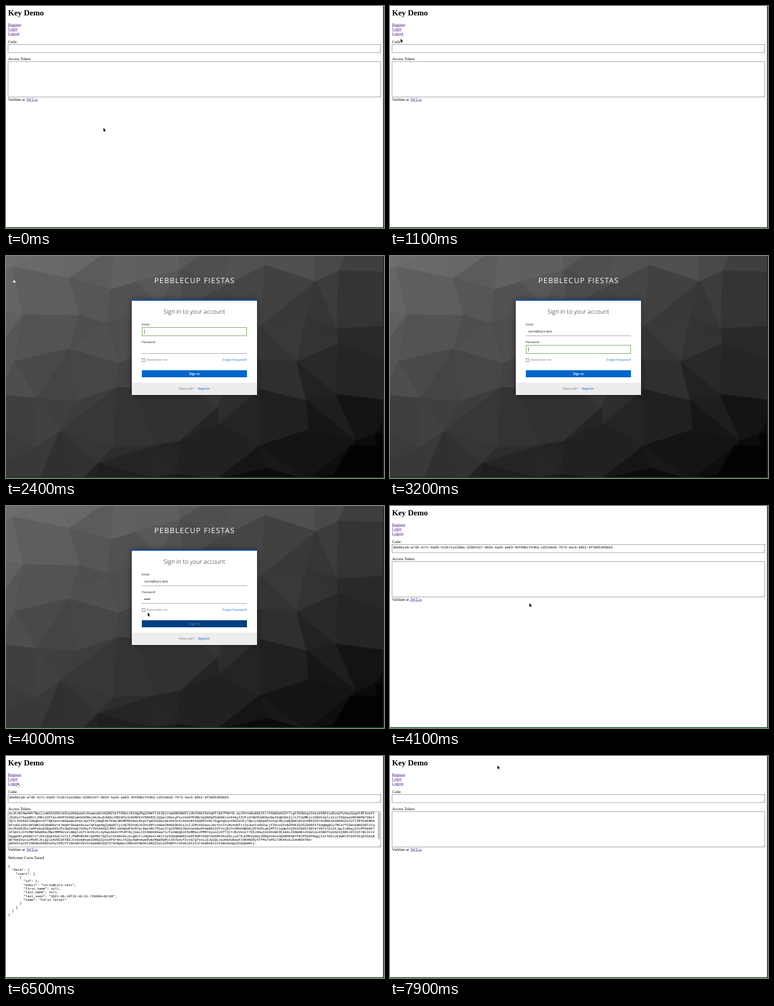
An HTML page with a canvas for the animation above (8000 ms loop, 640 by 377 pixels).

```html
<!DOCTYPE html>
<html lang="en">
<head>
<meta charset="utf-8">
<title>Sign-in demo</title>
<style>
html, body { margin: 0; width: 100%; height: 100%; overflow: hidden; background: #fff; }
canvas { display: block; width: 640px; height: 377px; }
</style>
</head>
<body>
<canvas id="stage"></canvas>
<script>
const W = 640, H = 377, LOOP = 8000, STEP = 100;
const SERIF = '"Liberation Serif", "Times New Roman", serif';
const MONO = '"Liberation Mono", "Courier New", monospace';
const SANS = '"Open Sans", sans-serif';
const VISITED = '#551a8b', BLUE = '#0066cc', GREY = '#72767b', INK = '#151515';
const EMAIL = 'corin@tarn.test', NAME = 'Corin Tarnel';
const CODE = '36e0bca8-a748-417c-b6d5-512b7ca13b8a.52882437-0654-4a34-ae83-46f08bcf440d.cd210dd3-7973-4ecb-8861-6f3065499b65';
const USER = {
  id: 1, email: EMAIL, first_name: null, last_name: null,
  last_seen: '2021-06-19T15:40:31.728586+00:00', name: NAME
};
const JSON_LINES = JSON.stringify({ data: { users: [USER] } }, null, 2).split('\n');

const canvas = document.getElementById('stage');
const dpr = window.devicePixelRatio || 1;
canvas.width = W * dpr;
canvas.height = H * dpr;
const ctx = canvas.getContext('2d');

function seeded(seed) {
  return () => {
    seed = (seed * 1664525 + 1013904223) >>> 0;
    return seed / 4294967296;
  };
}

function makeToken() {
  const rnd = seeded(77);
  const set = 'ABCDEFGHIJKLMNOPQRSTUVWXYZabcdefghijklmnopqrstuvwxyz0123456789IJYWMNZXb';
  const chars = n => Array.from({ length: n }, () => set[Math.floor(rnd() * set.length)]).join('');
  const lines = Array.from({ length: 7 }, () => chars(183));
  lines[0] = 'eyJ' + lines[0].slice(3, 113) + '.eyJ' + lines[0].slice(117);
  lines.push(chars(151) + '-', chars(123) + '-');
  return lines;
}
const TOKEN = makeToken();

function box(x, y, w, h, fill) {
  ctx.fillStyle = fill;
  ctx.fillRect(x, y, w, h);
}

function text(str, x, y, font, color = '#000', align = 'left') {
  ctx.font = font;
  ctx.fillStyle = color;
  ctx.textAlign = align;
  ctx.fillText(str, x, y);
  return ctx.measureText(str).width;
}

function path(points, fill, stroke, width = 1) {
  ctx.beginPath();
  points.forEach(([x, y]) => ctx.lineTo(x, y));
  ctx.closePath();
  if (stroke) {
    ctx.strokeStyle = stroke;
    ctx.lineWidth = width;
    ctx.stroke();
  }
  ctx.fillStyle = fill;
  ctx.fill();
}

function link(str, x, y) {
  const w = text(str, x, y, '6.78px ' + SERIF, VISITED);
  box(x, y + 0.7, w, 0.55, VISITED);
}

function textarea(y, h) {
  ctx.strokeStyle = '#858585';
  ctx.lineWidth = 0.7;
  ctx.strokeRect(3.4, y, 631.3, h);
  ctx.strokeStyle = '#999';
  ctx.lineWidth = 0.4;
  ctx.beginPath();
  for (const d of [1.8, 3.6]) {
    ctx.moveTo(634 - d, y + h - 0.6);
    ctx.lineTo(634, y + h - 0.6 - d);
  }
  ctx.stroke();
}

function drawHome(t) {
  const body = '6.78px ' + SERIF, area = '5.65px ' + MONO;
  const on = (from, to = 6700) => t >= from && t < to;
  box(0, 0, W, H, '#fff');
  text('Key Demo', 3.4, 16, 'bold 13.57px ' + SERIF);
  ['Register', 'Login', 'Logout'].forEach((s, i) => link(s, 3.4, 33.8 + i * 7.63));
  text('Code:', 3.4, 63.4, body);
  textarea(65.6, 13.5);
  text('Access Token:', 3.4, 92.2, body);
  textarea(94.3, 60.2);
  text('Validate at ', 3.4, 160.6, body);
  link('JWT.io', 34.2, 160.6);

  if (on(4100)) text(CODE, 4.7, 71.6, area);
  if (on(4200)) {
    TOKEN.forEach((s, i) => text(s, 4.7, 99.4 + i * 6.37, area));
    box(628.8, 94.8, 5.4, 55, '#fafafa');
    ctx.fillStyle = '#c1c1c1';
    ctx.beginPath();
    ctx.roundRect(629.8, 95.6, 3.4, 46, 1.7);
    ctx.fill();
  }
  if (on(4500)) text('Welcome ' + NAME, 3.4, 174.6, body);
  if (on(4800)) JSON_LINES.forEach((s, i) => text(s, 3.4, 188.8 + i * 6.36, '5.51px ' + MONO));
}

// Faceted backdrop: jittered cells, some split in two, darker towards bottom right.
function drawBackdrop() {
  const rnd = seeded(2024), cols = 11, rows = 7;
  const at = (i, j) => [(i + rnd() * 0.7 - 0.85) * 68, (j + rnd() * 0.7 - 0.85) * 68];
  const grid = Array.from({ length: rows + 1 }, (_, j) =>
    Array.from({ length: cols + 1 }, (_, i) => at(i, j)));
  const facet = pts => {
    const mid = k => pts.reduce((s, p) => s + p[k], 0) / pts.length;
    const v = 112 - 0.077 * mid(0) - 0.16 * mid(1) + (rnd() - 0.5) * 9;
    const g = Math.max(2, Math.round(v));
    const c = `rgb(${g},${g},${g})`;
    path(pts, c, c, 0.6);
  };
  box(0, 0, W, H, '#333');
  for (let j = 0; j < rows; j++) {
    for (let i = 0; i < cols; i++) {
      const a = grid[j][i], b = grid[j][i + 1], c = grid[j + 1][i + 1], d = grid[j + 1][i];
      const split = rnd();
      if (split < 0.3) { facet([a, b, c]); facet([a, c, d]); }
      else if (split < 0.6) { facet([a, b, d]); facet([b, c, d]); }
      else facet([a, b, c, d]);
    }
  }
  path([[583, 322], [640, 322], [640, 377], [551, 377]], '#020202');
}

function field(y, focused) {
  if (focused) {
    ctx.strokeStyle = '#84b070';
    ctx.lineWidth = 1;
    ctx.strokeRect(230.5, y, 177, 14);
  } else {
    box(230, y + 13.5, 178, 1, '#adafb1');
  }
}

function drawLogin(t) {
  const small = '5.05px ' + SANS, input = '5.6px ' + SANS;
  const typed = Math.max(0, Math.min(EMAIL.length, Math.round((t - 2400) / STEP * 2)));
  const dots = Math.max(0, Math.min(4, (t - 3200) / STEP));
  const sent = t >= 3700;
  const focus = sent ? '' : t < 3200 ? 'email' : 'password';

  drawBackdrop();
  ctx.letterSpacing = '1.26px';
  text('PEBBLECUP FIESTAS', 319.5, 46.3, '12.4px ' + SANS, '#fff', 'center');
  ctx.letterSpacing = '0px';

  ctx.shadowColor = 'rgba(0,0,0,.4)';
  ctx.shadowBlur = 10 * dpr;
  box(213, 74, 212, 162, '#fff');
  ctx.shadowColor = 'transparent';
  box(213, 74, 212, 2, '#0b58a8');
  box(213, 215, 212, 21, '#ededed');
  text('Sign in to your account', 319, 98, '300 10.2px ' + SANS, INK, 'center');

  text('Email', 230, 118.3, small, INK);
  field(121.5, focus === 'email');
  const w = text(EMAIL.slice(0, typed), 233.9, 130, input, INK);
  if (focus === 'email') box(233.9 + w, 124.8, 0.6, 7.2, '#222');

  text('Password', 230, 148.3, small, INK);
  field(151.5, focus === 'password');
  ctx.fillStyle = INK;
  for (let i = 0; i < dots; i++) {
    ctx.beginPath();
    ctx.arc(235.2 + i * 2.6, 158.3, 0.95, 0, 7);
    ctx.fill();
  }
  if (focus === 'password') box(234 + dots * 2.6, 154.8, 0.6, 7.2, '#222');

  ctx.strokeStyle = '#767676';
  ctx.lineWidth = 0.7;
  ctx.strokeRect(230.5, 174.4, 5, 5);
  text('Remember me', 238.6, 178.4, small, GREY);
  text('Forgot Password?', 408.2, 178.3, small, BLUE, 'right');
  box(230, 194, 178, 12, sent ? '#004080' : BLUE);
  text('Sign in', 319, 201.9, '600 5.7px ' + SANS, sent ? '#56738f' : '#fff', 'center');
  text('New user?', 292.8, 227.4, '5.4px ' + SANS, GREY);
  text('Register', 325, 227.4, '5.4px ' + SANS, BLUE);
}

const CURSORS = {
  arrow() {
    path([[0, 0], [0, 5.9], [1.3, 4.7], [2.3, 6.9], [3.2, 6.5], [2.3, 4.4], [4.1, 4.3]], '#000', '#fff', 0.8);
  },
  hand() {
    ctx.translate(0.8, 0);
    ctx.scale(0.88, 0.88);
    path([[1.7, 0.3], [2.7, 0.4], [3, 2.4], [5.6, 2.9], [6.3, 3.6], [6, 5.4], [5.3, 7], [2.7, 7],
      [0.4, 4.6], [0.6, 3.8], [1.9, 4.4]], '#fff', '#000', 0.9);
  },
  beam() {
    box(0, -3, 0.6, 6, '#444');
  },
  none() {}
};

// time, x, y, shape
const MOVES = [
  [0, 165, 207, 'arrow'], [300, 39, 107, 'arrow'], [400, 39, 107, 'arrow'], [1300, 12, 41, 'hand'],
  [1500, 16, 43, 'hand'], [1700, 10, 40, 'hand'], [1900, 10, 40, 'hand'], [2000, 11, 37, 'hand'],
  [2200, 10, 39.4, 'hand'], [2600, 10, 39.4, 'none'], [3500, 14, 43, 'arrow'], [3900, 240, 181, 'arrow'],
  [4000, 240, 181, 'arrow'], [4100, 236, 165, 'arrow'], [4200, 228, 150, 'beam'], [4600, 200, 125, 'beam'],
  [4700, 200, 125, 'beam'], [5100, 190, 140, 'beam'], [5300, 190, 140, 'beam'], [5400, 170, 186, 'arrow'],
  [6000, 16, 47, 'hand'], [6700, 16, 46.5, 'hand'], [7100, 13, 38, 'hand'], [7300, 13, 38, 'hand'],
  [7400, 24, 37, 'arrow'], [7900, 182, 16, 'arrow'], [LOOP, 182, 16, 'arrow']
];

function drawCursor(t) {
  const i = MOVES.findIndex(m => m[0] > t);
  const [t0, x0, y0, shape] = MOVES[i - 1], [t1, x1, y1] = MOVES[i];
  const k = (t - t0) / (t1 - t0);
  ctx.save();
  ctx.translate(x0 + (x1 - x0) * k, y0 + (y1 - y0) * k);
  ctx.lineJoin = 'round';
  CURSORS[shape]();
  ctx.restore();
}

function render(now) {
  const t = Math.floor((now % LOOP) / STEP) * STEP;
  ctx.setTransform(dpr, 0, 0, dpr, 0, 0);
  ctx.textRendering = 'geometricPrecision';
  if (t >= 2400 && t < 4100) drawLogin(t);
  else drawHome(t);
  drawCursor(t);
  box(638.5, 0, 1.5, H, '#262626');
  box(0, 375.7, W, 1.3, '#0b520b');
}

let start;
function tick(now) {
  if (start === undefined) start = now;
  render(Math.max(0, now - start));
  requestAnimationFrame(tick);
}
requestAnimationFrame(tick);
</script>
</body>
</html>
```
